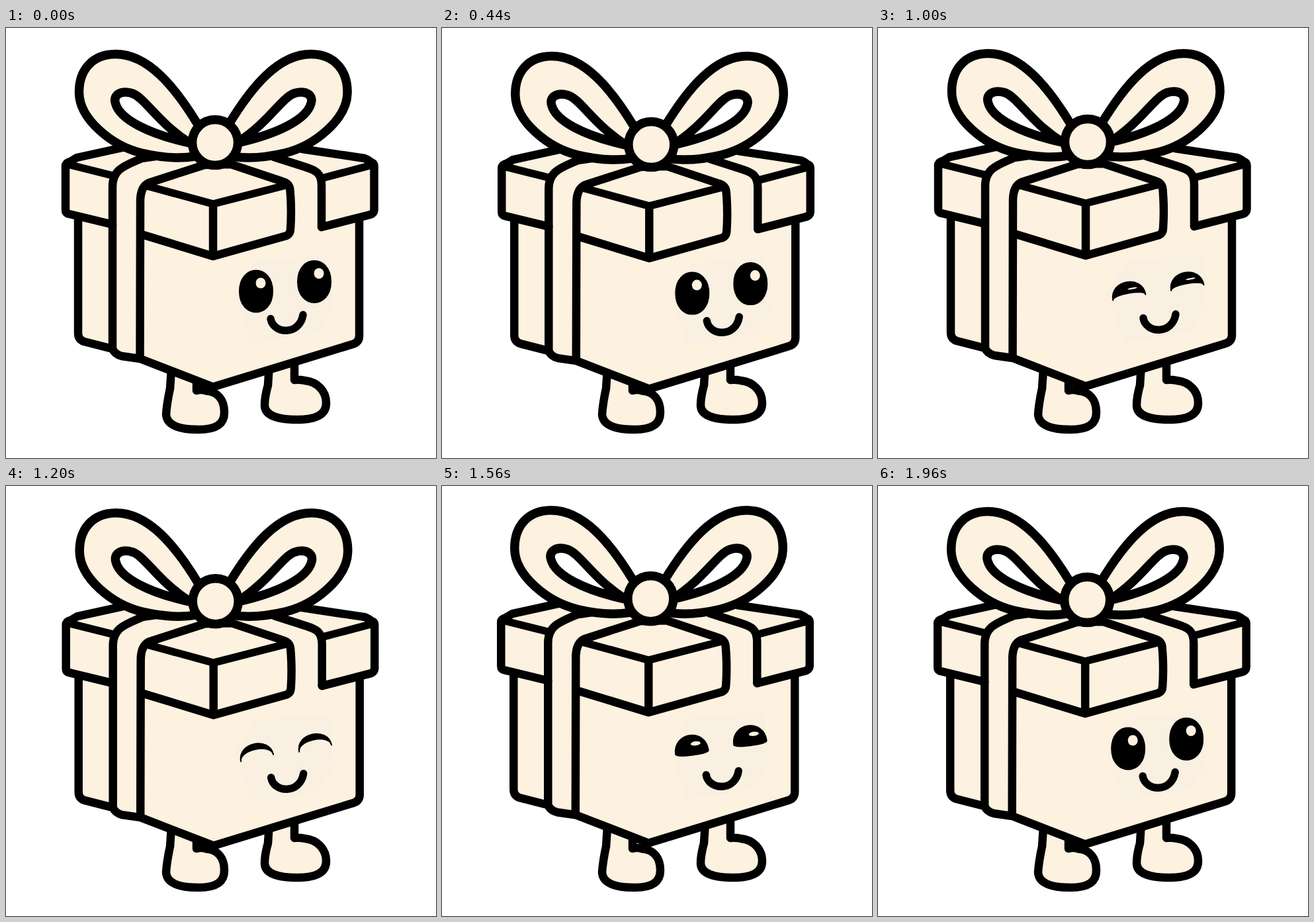
An HTML page for the animation above (2 s loop, 650 by 650 pixels).

```html
<!DOCTYPE html>
<html lang="en">
<head>
<meta charset="utf-8">
<title>Gift box</title>
<style>
html, body { margin: 0; width: 100%; height: 100%; overflow: hidden; background: #fff; }
svg { display: block; width: 650px; height: 650px; }
.ink { fill: none; stroke: #000; stroke-width: 12.5; stroke-linejoin: round; stroke-linecap: round; }
.cream { fill: #fdf1df; }
.thin { stroke-width: 11.5; }
.bold { stroke-width: 13.5; }
</style>
</head>
<body>
<svg viewBox="0 0 650 650">
  <defs>
    <path id="loop" class="ink cream bold" fill-rule="evenodd" d="M290 146 C256 90 215 39 165 39.500 C130 40 110 64 110.500 98 C111 138 160 178 205 189 C235 196 262 198 286 194 Z
      M278 174 C228 142 210 105 190 98.500 C175 94 161 100 165.500 114 C172 138 215 160 278 174 Z"/>
  </defs>

  <!-- feet stay on the ground -->
  <g class="ink cream">
    <path d="M250 515 L248 545 Q243 568 242 584 C243 601 264 607 291 607 C316 607 330 600 330 581 C330 562 320 550 303 548.500 Q295 546 288 548 V525"/>
    <path d="M398 508 L396 540 Q391 558 391 570 C391 586 412 592 440 592 C468 592 484 585 484 567 C484 548 470 535 452 533 Q443 531 436 532 V500"/>
  </g>

  <g id="body">
    <!-- box -->
    <path class="ink cream" d="M109 285 V461 Q109 471 118 474 L161 485 Q164 493 175 496 L203 500 L313 542.500 L524 478 Q534 475 534 465 V280 L313 260 Z"/>

    <!-- lid -->
    <path class="cream" d="M90 207 L172 182 L313 165 L455 184 L556 205 V281 L477 301 L313 345 L90 279 Z"/>
    <path class="ink" d="M161 297 L95 281 Q90 280 90 275 V210 Q89 204 97 202 L107 196 L180 180"/>
    <path class="ink" d="M448 183 L542 197 Q549 200 552 203 Q557 204 556.500 211 V275 Q556 280 551 282 L477 301"/>
    <path class="ink thin" d="M97 207 L161 223 M478 227 L550 208"/>
    <path class="ink" d="M161 484 V240 C161 213 180 208 205 197 L240 192"/>
    <path class="ink" d="M477 300 V238 C477 219 468 215 452 210 L405 195"/>

    <!-- front panel of the lid -->
    <path class="ink" d="M202.500 498 L203 262 Q203 240 216 234 L300 207 L340 206 L418 232 Q429 235 429.500 246 Q432 275 430 304 Q430 311 424 314 L313 345 L205 312"/>
    <path class="ink thin" d="M214 239 L313 266 L422 238"/>
    <path class="ink" d="M313 267 V344"/>

    <!-- bow -->
    <use href="#loop"/>
    <use href="#loop" transform="matrix(-1 0 0 1 626.500 0)"/>
    <circle class="ink cream bold" cx="316" cy="173" r="34.500"/>

    <!-- face -->
    <path fill="#f9f0e1" d="M375 354 L488 343 L496 425 L468 460 L371 477 L345 402 Z"/>
    <g id="face"></g>
    <path class="ink thin" d="M400 439.500 C404 463 444 465 449 433.500"/>
  </g>
</svg>
<script>
const LOOP = 2000, STEP = 40;
const { sin, cos, PI } = Math;
const body = document.getElementById('body');
const face = document.getElementById('face');

function add(tag, parent, attrs) {
  const el = document.createElementNS('http://www.w3.org/2000/svg', tag);
  set(el, attrs);
  return parent.appendChild(el);
}

function set(el, attrs) {
  for (const name in attrs) el.setAttribute(name, attrs[name]);
}

function makeEye(x, y) {
  const group = add('g', face, {});
  const shape = add('path', group, { stroke: '#000', 'stroke-width': 2, 'stroke-linejoin': 'round' });
  const glint = add('ellipse', group, { cx: 7, cy: -12.5, rx: 7.5, fill: '#fdf1df' });
  return { x, y, group, shape, glint };
}
const eyes = [makeEye(378, 398), makeEye(466, 383.5)];

// shut: 0 is a full oval, 1 a thin arch
function drawEye(eye, shut) {
  const w = 25, top = -42 + 13 * shut, bottom = 42 - 60 * shut;
  set(eye.group, { transform: `translate(${eye.x + shut} ${eye.y + 12 * shut}) rotate(${-12 * shut})` });
  set(eye.shape, { d: `M${-w} 0C${-w} ${top} ${w} ${top} ${w} 0C${w} ${bottom} ${-w} ${bottom} ${-w} 0Z` });
  set(eye.glint, { ry: 8 * (1 - shut) });
}

// eased rise from 0 to 1 between two times
function ramp(t, from, to) {
  const u = Math.min(1, Math.max(0, (t - from) / (to - from)));
  return u * u * (3 - 2 * u);
}

function draw(t) {
  const a = 2 * PI * t / LOOP;
  const x = .55 * cos(2 * a - .4) - .7 * cos(3 * a - .8);
  const y = 1.9 * sin(a + .26) + 3.1 * sin(2 * a - .09) - .2;
  set(body, { transform: `translate(${x} ${y})` });
  const shut = ramp(t, 880, 1040) - ramp(t, 1500, 1640);
  eyes.forEach(eye => drawEye(eye, shut));
}

const start = performance.now();
function tick() {
  const t = (performance.now() - start) % LOOP;
  draw(Math.floor(t / STEP) * STEP);
  requestAnimationFrame(tick);
}
tick();
</script>
</body>
</html>
```
